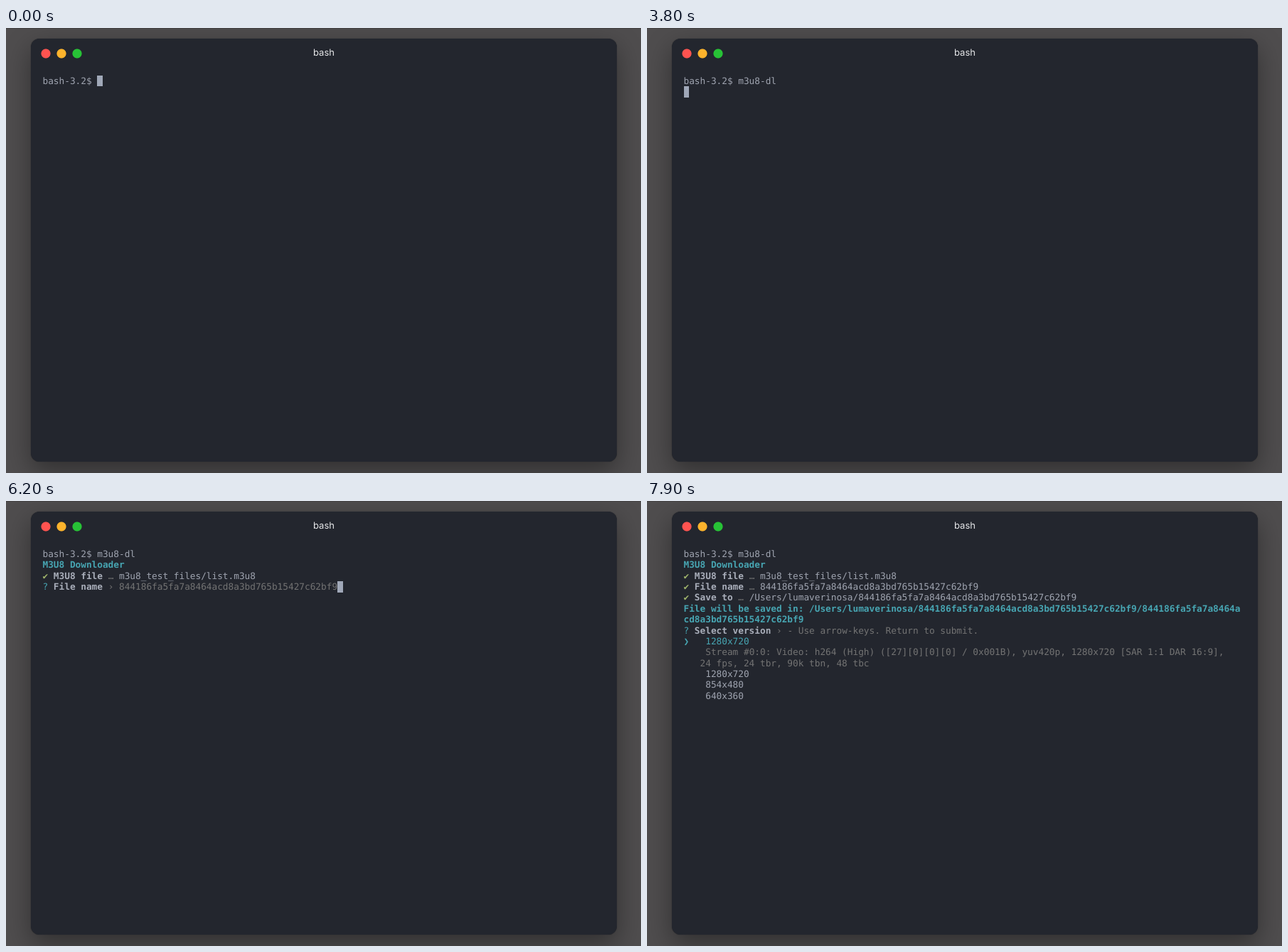
These frames come from a looping animation (893x627 px, 8000 ms). An HTML page:

```html
<!DOCTYPE html>
<html lang="en">
<head>
<meta charset="utf-8">
<title>bash</title>
<style>
html, body { margin: 0; width: 100%; height: 100%; overflow: hidden; }
body { position: relative; background: #4f4d4e; box-shadow: inset 0 1px #434142; text-rendering: geometricPrecision; }
#window {
  position: absolute; left: 35px; top: 15px; width: 824px; height: 595.5px; border-radius: 12px;
  background: #23262e; box-shadow: 0 0 1px #1a1b1f, 0 13px 36px rgba(0, 0, 0, .38);
}
#title {
  position: absolute; left: 0; right: 0; top: 10px; text-align: center;
  font: 13px/20px Inter, sans-serif; color: #e6e7e9;
}
.light {
  position: absolute; top: 14px; width: 14px; height: 14px;
  background: radial-gradient(circle, var(--tint) 6.1px, transparent 7px);
}
#screen {
  position: absolute; left: 16.5px; top: 53px;
  font: 12.757px/15.37px "DejaVu Sans Mono", monospace; color: #9fa4b0;
}
#screen span { position: absolute; white-space: pre; }
.bold { font-weight: bold; color: #a9aeba; }
.cyan { color: #47a5b2; }
.head { color: #47a5b2; font-weight: bold; }
.dim { color: #737373; }
.green { color: #a0b56c; }
.cursor { margin-top: -1px; width: 7.7px; height: 15.4px; background: #a0a8b8; }
</style>
</head>
<body>
<div id="window">
  <i class="light" style="left:14px;--tint:#ff5350"></i>
  <i class="light" style="left:36px;--tint:#fdb32c"></i>
  <i class="light" style="left:58px;--tint:#27c236"></i>
  <div id="title">bash</div>
  <div id="screen"></div>
</div>
<script>
const CELL = 7.68, LINE = 15.37, LOOP = 8000;
const COMMAND = "m3u8-dl", LIST = "m3u8_test_files/list.m3u8";
const HASH = "844186fa5fa7a8464acd8a3bd765b15427c62bf9";
const FOLDER = "/Users/lumaverinosa/" + HASH;
// times of key events in ms
const TYPE = 1500, KEY = 100, ENTER = 2500, START = 4000, PASTE = 5000;
const NAME = 5900, SAVE = 6500, SAVED = 7400, SELECT = 7700;

const screen = document.getElementById("screen");
let html;

function put(row, col, text, style = "") {
  html += `<span class="${style}" style="left:${col * CELL}px;top:${row * LINE}px">${text}</span>`;
}

const cursor = (row, col) => put(row, col, "", "cursor");

function question(row, label, answer, done, hint) {
  const mark = label.length + 3;
  put(row, 0, done ? "✔" : "?", done ? "green" : "cyan");
  put(row, 2, label, "bold");
  put(row, mark, done ? "…" : "›", "dim");
  put(row, mark + 2, answer, hint && !done ? "dim" : "");
  if (!done) cursor(row, mark + 2 + answer.length);
}

function select() {
  put(7, 0, "?", "cyan");
  put(7, 2, "Select version", "bold");
  put(7, 17, "› - Use arrow-keys. Return to submit.", "dim");
  put(8, 0, "❯", "cyan");
  put(8, 4, "1280x720", "cyan");
  put(9, 4, "Stream #0:0: Video: h264 (High) ([27][0][0][0] / 0x001B), yuv420p, 1280x720 [SAR 1:1 DAR 16:9],", "dim");
  put(10, 3, "24 fps, 24 tbr, 90k tbn, 48 tbc", "dim");
  ["1280x720", "854x480", "640x360"].forEach((size, i) => put(11 + i, 4, size));
}

function render(t) {
  html = "";
  const typed = COMMAND.slice(0, Math.max(0, Math.floor((t - TYPE) / KEY) + 1));
  put(0, 0, "bash-3.2$ " + typed);
  if (t < ENTER) cursor(0, 10 + typed.length);
  else if (t < START) cursor(1, 0);
  else {
    put(1, 0, "M3U8 Downloader", "head");
    question(2, "M3U8 file", t < PASTE ? "" : LIST, t >= NAME);
    if (t >= NAME) question(3, "File name", HASH, t >= SAVE, true);
    if (t >= SAVE) question(4, "Save to", FOLDER, t >= SAVED, true);
    if (t >= SAVED) {
      const saved = `File will be saved in: ${FOLDER}/${HASH}`;
      put(5, 0, saved.slice(0, 102), "head");
      put(6, 0, saved.slice(102), "head");
    }
    if (t >= SELECT) select();
  }
  return html;
}

let shown;
const begin = performance.now();
function tick() {
  const next = render((performance.now() - begin) % LOOP);
  if (next !== shown) screen.innerHTML = shown = next;
  requestAnimationFrame(tick);
}
tick();
</script>
</body>
</html>
```
